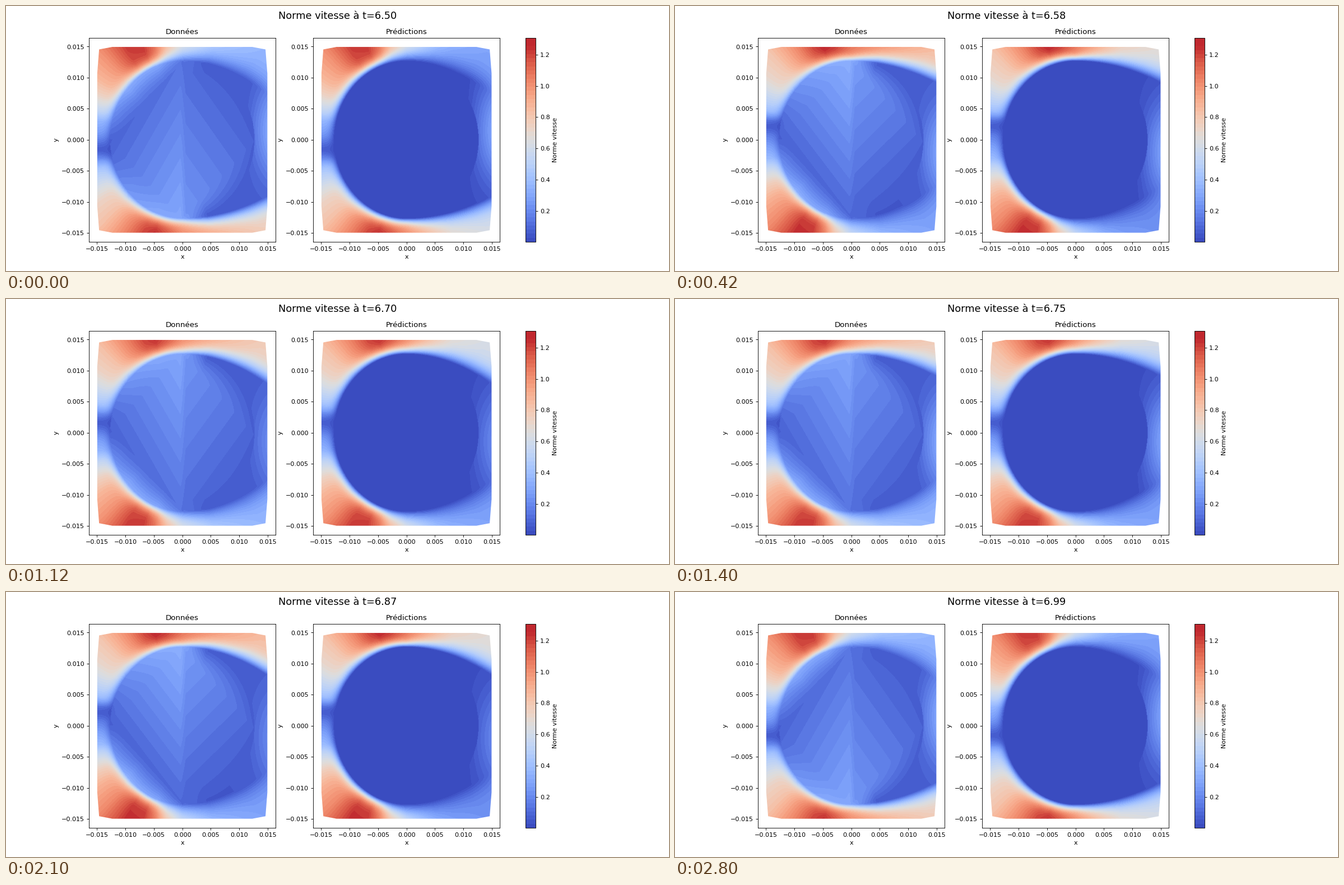
These frames come from a looping animation (1183x473 px, 2.94 s). A matplotlib script:

```python
import numpy as np
import matplotlib.pyplot as plt
from matplotlib.animation import FuncAnimation
from matplotlib.colors import ListedColormap
from matplotlib.patches import Polygon

DPI, FRAMES, STEP_MS = 80, 21, 140
R, HALF = 12.7, 15.0          # cylinder radius and half box, mm
VMAX = 1.308

# Speed along the outer box against the angle from the upstream axis,
# for the quiet (LO) and the active (HI) side of the shedding cycle.
ANG = [-8, 0, 12, 18, 27, 34, 44, 56, 65, 72, 79, 90, 110, 135]
LO = [.15, .22, .40, .57, .78, .90, 1.02, 1.24, 1.23, 1.05, .78, .52, .35, .28]
HI = [.20, .10, .24, .42, .58, .70, .80, 1.00, 1.18, 1.27, 1.22, 1.08, .98, .86]
WALL_ANG = [0, 15, 40, 70, 90, 110, 180]
WALL_LO = [.08, .20, .34, .30, .12, .05, .06]
WALL_HI = [.06, .10, .22, .32, .34, .08, .06]

grid = np.linspace(-HALF, HALF, 361)
X, Y = np.meshgrid(grid, grid)
RAD = np.maximum(np.hypot(X, Y), 1e-6)
INSIDE = RAD < R


def mix(a, b, t):
    return a + (b - a) * t


def curve(angle, knots, lo, hi, act):
    return mix(np.interp(angle, knots, lo), np.interp(angle, knots, hi), act)


def side(y, act, drift, smooth):
    """Speed outside the cylinder on the side where y > 0."""
    ang = np.degrees(np.arctan2(y, -X))
    ang = np.where((ang < -90) & (X > 0), 180, ang)
    edge = curve(ang, ANG, LO, HI, act)
    wall = curve(ang, WALL_ANG, WALL_LO, WALL_HI, act) if smooth else .02
    rad = np.radians(ang)
    reach = HALF / np.maximum(abs(np.cos(rad)), abs(np.sin(rad))) - R
    thick = np.interp(ang, [0, 45, 70, 90], [1, 1.3, 1.3, mix(2, .9, act)])

    # behind the top of the cylinder the layer leaves the wall
    back = X > 0
    drop = mix(5.5, 4 - .9 * drift, act)
    sep = R - drop * (X / HALF) ** 2
    dist = np.where(back, y - sep, RAD - R)
    reach = np.where(back, HALF - sep, reach)
    thick = np.where(back, mix(2, .9, act) + .1 * X, thick)
    if not smooth:
        edge = edge * (1 - .2 * np.clip(X / 8, 0, 1))
    rise = np.tanh(np.maximum(dist, 0) / thick) / np.tanh(reach / thick)
    return wall + (edge - wall) * np.minimum(rise, 1.05)


def diamond(act, stag):
    """Linear interpolation between four wall points, spread to the circle."""
    tilt = np.where(X < 0, .45 * stag, -.3)
    frac = abs(X) / 12.5
    yy = Y - tilt * np.minimum(frac, 1)
    norm = np.maximum(frac + abs(yy) / 12.6, 1e-6)
    scale = np.maximum(norm, 1)
    px, py = frac / scale, yy / 12.6 / scale
    dim = 1 - .2 * np.clip((X + .3) / .9, 0, 1)
    top, low = (.1 + .24 * act) * dim, (.34 - .24 * act) * dim
    core = .09 * px + top * (1 - px + py) / 2 + low * (1 - px - py) / 2

    ang = np.degrees(np.arctan2(abs(Y), -X))
    wall = np.where(Y > 0, curve(ang, WALL_ANG, WALL_LO, WALL_HI, act),
                    curve(ang, WALL_ANG, WALL_LO, WALL_HI, 1 - act))
    span = np.maximum(norm * R / RAD - 1, .03)
    return mix(core, wall, np.clip((norm - 1) / span, 0, 1) ** 1.3)


def speed(i, smooth):
    phase = .15 * i
    turn = 2 * np.pi * (phase - .35)
    up, drift = np.cos(turn), np.sin(turn)
    act = np.clip(.5 + .6 * up, 0, 1)
    stag = 2.8 * up

    upper = side(Y, act, drift, smooth)
    lower = side(-Y, 1 - act, -drift, smooth)
    pivot = np.where(X < 0, stag, 0)
    share = 1 / (1 + np.exp(-np.clip((Y - pivot) / .6, -50, 50)))
    flow = mix(lower, upper, share)
    dip = .6 * np.exp(-((Y - stag) / 1.3) ** 2)
    flow = flow * np.where(X < 0, 1 - dip, 1)

    amp = .23 + .05 * np.cos(4 * np.pi * phase)
    ramp = np.clip((X - 10.5) / 4.5, 0, 1)
    wake = amp * ramp * np.exp(-((Y + 2.5 * up) / 8.5) ** 2)
    flow = np.hypot(flow, wake)
    body = diamond(act, stag) if smooth else .012 + .006 * (X > 0)
    return np.where(INSIDE, body, flow)


shades = np.minimum(np.linspace(0, 1, 50), .965)
cmap = ListedColormap(plt.get_cmap("coolwarm")(shades))

fig, axs = plt.subplots(1, 2, dpi=DPI,
                        figsize=(1183.01 / DPI, 473.01 / DPI))
heading = fig.suptitle("", fontsize=16)

quarter = np.array([(14.95, 10.7), (14.62, 14.55), (12.3, 14.95)])
hull = np.vstack([quarter, quarter[::-1] * (-1, 1), -quarter,
                  quarter[::-1] * (1, -1)]) / 1000
ticks = np.arange(-3, 4) * .005
box = np.array([-HALF, HALF, -HALF, HALF]) / 1000

images = []
for ax, name in zip(axs, ("Données", "Prédictions")):
    im = ax.imshow(np.zeros_like(X), extent=box, origin="lower", cmap=cmap,
                   vmin=.001, vmax=VMAX, aspect="auto",
                   interpolation="bilinear")
    im.set_clip_path(Polygon(hull, transform=ax.transData))
    ax.set(title=name, xlabel="x", ylabel="y", xticks=ticks, yticks=ticks,
           xlim=(-.01642, .01642), ylim=(-.01642, .01642))
    images.append(im)

fig.colorbar(images[0], ax=axs, label="Norme vitesse",
             ticks=np.arange(1, 7) * .2)


def draw(i):
    heading.set_text(f"Norme vitesse à t={6.504 + .0245 * i:.2f}")
    for im, smooth in zip(images, (True, False)):
        im.set_data(speed(i, smooth))
    return [heading, *images]


anim = FuncAnimation(fig, draw, frames=FRAMES, interval=STEP_MS,
                     repeat=True, repeat_delay=0, blit=False)
plt.show()
```
